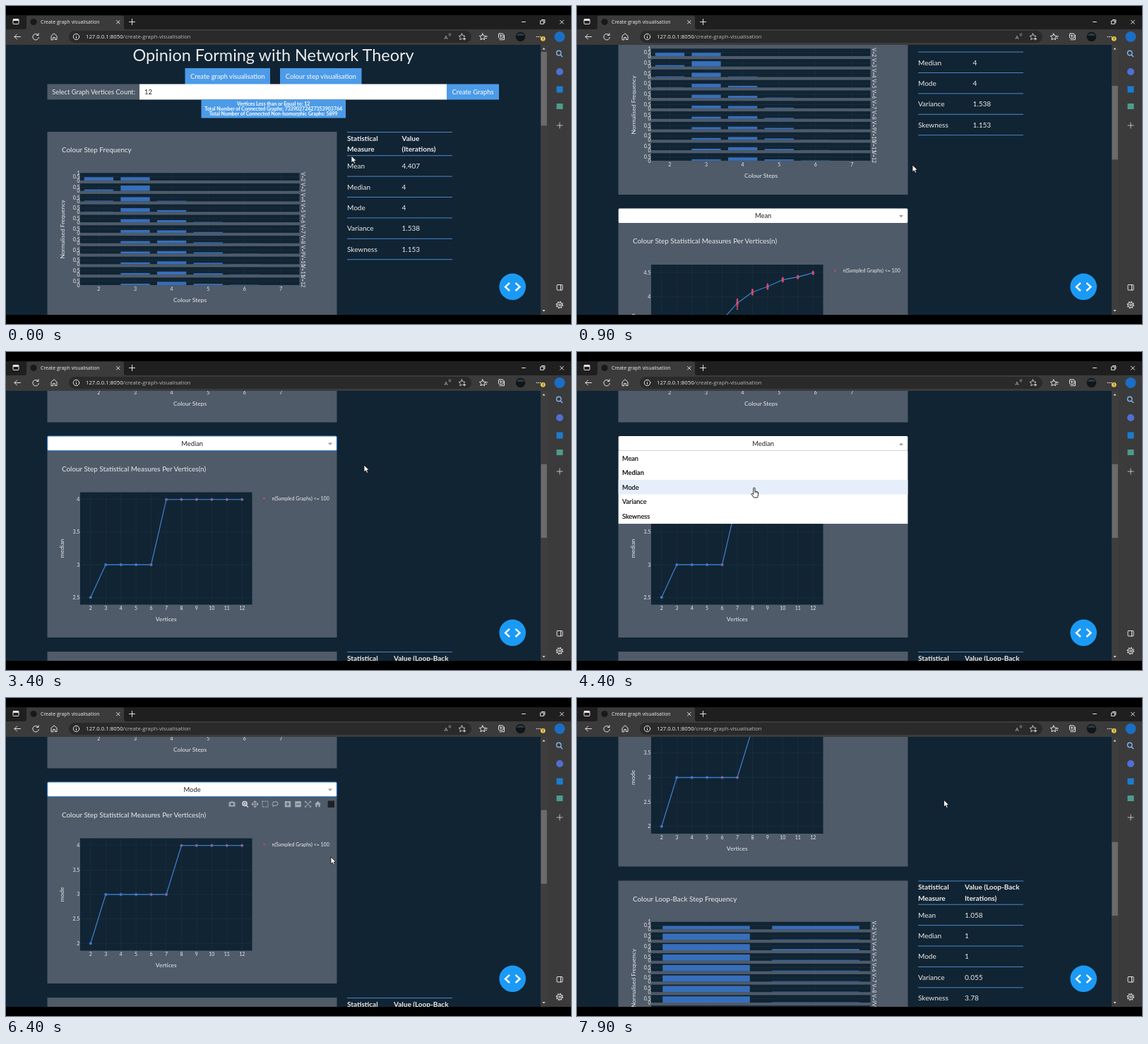
Animation, 800 px wide and 450 px high, one loop 8 s. Source, as an HTML page:

```html
<!DOCTYPE html>
<html lang="en">
<head>
<meta charset="utf-8">
<title>Create graph visualisation</title>
<style>
html, body { margin: 0; width: 100%; height: 100%; overflow: hidden; background: #000; }
svg { display: block; width: 800px; height: 450px; }
text { font-family: Lato, "Open Sans", sans-serif; white-space: pre; }
.ui { font-family: "Open Sans", "Noto Sans", sans-serif; }
.ico { fill: none; stroke: #e4e4e4; stroke-width: 1; stroke-linecap: round; stroke-linejoin: round; }
</style>
</head>
<body>
<svg id="stage" viewBox="0 0 800 450" xmlns="http://www.w3.org/2000/svg"></svg>
<script>
const LOOP = 8000, STEP = 100;
const NAVY = '#112433', CARD = '#4f5b69', BLUE = '#4c9be8', BAR = '#386fba', GRID = '#1d3343', RED = '#d9485e', PALE = '#ebebeb';
const MENU_Y = 462.5, LIST_Y = 483, ROW_H = 20.65;

const rect = (x, y, w, h, fill, more = '') => `<rect x="${x}" y="${y}" width="${w}" height="${h}" fill="${fill}" ${more}/>`;
const disc = (x, y, r, fill, more = '') => `<circle cx="${x}" cy="${y}" r="${r}" fill="${fill}" ${more}/>`;
const path = (d, more = 'class="ico"') => `<path d="${d}" ${more}/>`;
const text = (s, x, y, size = 9.375, fill = PALE, more = '') =>
  `<text x="${x}" y="${y}" font-size="${size}" fill="${fill}" ${more}>${s.replace(/</g, '&lt;')}</text>`;
const mid = 'text-anchor="middle" ', end = 'text-anchor="end" ', bold = 'font-weight="700" ';
const medium = 'stroke="#111" stroke-width=".2"';
const turned = (s, x, y, size, angle) =>
  `<g transform="translate(${x} ${y}) rotate(${angle})">${text(s, 0, size * .34, size, PALE, mid)}</g>`;
const range = (n, f) => Array.from({ length: n }, (_, i) => f(i)).join('');

function header() {
  const button = (x, w, s) => rect(x, 88, w, 23, BLUE) + text(s, x + w / 2, 103, 9.375, '#fff', mid);
  const notes = ['Vertices Less than or Equal to: 12',
    'Total Number of Connected Graphs: 73390272427353903764',
    'Total Number of Connected Non-Isomorphic Graphs: 5899'];
  return text('Opinion Forming with Network Theory', 378.5, 77.7, 23.44, PALE, mid) +
    button(253.5, 120.5, 'Create graph visualisation') + button(388, 115.5, 'Colour step visualisation') +
    rect(58.5, 110.5, 131, 22, CARD) + text('Select Graph Vertices Count:', 65.3, 125) +
    rect(189, 110.5, 435, 22, '#fff') + text('12', 196, 125, 9.375, '#222') +
    rect(624, 110.5, 74, 22, BLUE) + text('Create Graphs', 661, 125, 9.375, '#fff', mid) +
    rect(276.5, 132.5, 204.5, 26, BLUE) +
    notes.map((s, i) => text(s, 378.7, 140.8 + i * 7.1, 7.03, '#fff', mid + bold)).join('');
}

function table(y, x2, head, values) {
  const names = ['Mean', 'Median', 'Mode', 'Variance', 'Skewness'];
  const size = 10;
  const line = dy => rect(483, y + dy - .5, 149, 1, '#4788c9');
  const heading = (lines, x) => lines.map((s, i) => text(s, x, y + 12.6 + i * 15.8, size, PALE, bold)).join('');
  return line(.5) + line(33.7) + heading(['Statistical', 'Measure'], 483) + heading(head, x2) +
    names.map((s, i) => {
      const dy = 33.7 + i * 29.4;
      return text(s, 483, y + dy + 18.4, size) + text(values[i], x2, y + dy + 18.4, size) + line(dy + 29.4);
    }).join('');
}

// Stack of eleven small bar charts, one per vertex count.
function barChart(y, title, rows, labels, x0, pitch, width) {
  const rowH = 10.6, gap = 14.8, top = y + 58.3;
  return rect(58.5, y, 410, 265, CARD) + text(title, 79, y + 29.3, 9.9) +
    range(rows.length, i => {
      const ry = top + i * gap, base = ry + rowH;
      return rect(105, ry, 310.5, rowH, NAVY) + rect(105, ry + rowH / 2 - .3, 310.5, .6, GRID) +
        labels.map((_, k) => rect(x0 + k * pitch - .3, ry, .6, rowH, GRID)).join('') +
        rows[i].map((v, k) => v ? rect(x0 + k * pitch - width / 2, base - v * rowH, width, v * rowH, BAR) : '').join('') +
        (i ? '' : text('1', 104.5, ry + 2.6, 7, PALE, end)) +
        text('0.5', 104.5, ry + rowH / 2 + 2.3, 7, PALE, end) + text('0', 104.5, base + 2.6, 7, PALE, end) +
        turned('V=' + (i + 2), 420.3, ry + rowH / 2, 7, 90);
    }) +
    labels.map((s, k) => text(s, x0 + k * pitch, y + 225.2, 7, PALE, mid)).join('') +
    turned('Normalised Frequency', 80, y + 138, 8.45, -90) +
    text('Colour Steps', 260.5, y + 241, 8.45, PALE, mid);
}

const SERIES = [
  { name: 'Mean', min: 2.5, max: 4.5, low: 690.7, high: 553, values: [2.5, 2.75, 3.04, 3.31, 3.525, 3.87, 4.095, 4.21, 4.35, 4.405, 4.49],
    spread: [0, 0, 0, 0, 6, 5.2, 3.6, 3.2, 2.6, 1.8, 1.8] },
  { name: 'Median', min: 2.5, max: 4, low: 690.7, high: 552.2, values: [2.5, 3, 3, 3, 3, 4, 4, 4, 4, 4, 4] },
  { name: 'Mode', min: 2, max: 4, low: 690.7, high: 552.2, values: [2, 3, 3, 3, 3, 3, 4, 4, 4, 4, 4] }
];
const OPTIONS = ['Mean', 'Median', 'Mode', 'Variance', 'Skewness'];

function lineChart({ name, min, max, low, high, values, spread }) {
  const px = i => 119.8 + i * 21.44;
  const py = v => low + (v - min) / (max - min) * (high - low);
  const ticks = (max - min) * 2 + 1;
  const pts = values.map((v, i) => `${px(i).toFixed(1)},${py(v).toFixed(1)}`).join(' ');
  const dots = (v, i) => {
    if (i < 4) return '';
    if (!spread) return disc(px(i), py(v), 1.5, RED, 'opacity=".75"');
    const n = i === 4 ? 2 : 6;
    return range(n, k => disc(px(i), py(v) + (k / (n - 1) * 2 - 1) * spread[i], 1.3, RED)) +
      (i === 5 ? disc(px(i), py(v) + 8.3, 1.2, RED) : '');
  };
  return rect(105, 542, 243.5, 159, NAVY) +
    range(11, i => rect(px(i) - .3, 542, .6, 159, GRID) + text(String(i + 2), px(i), 708.7, 7, PALE, mid)) +
    range(ticks, k => {
      const v = min + k / 2, y = py(v);
      return rect(105, y - .3, 243.5, .6, GRID) + text(String(v), 104.3, y + 2.5, 7, PALE, end);
    }) +
    `<polyline points="${pts}" fill="none" stroke="#3d7ac6" stroke-width="1.3"/>` +
    values.map((v, i) => disc(px(i), py(v), 2, '#3d7ac6')).join('') + values.map(dots).join('') +
    turned(name.toLowerCase(), 79, 621.5, 8.45, -90);
}

function modebar() {
  const at = (x, d) => `<g transform="translate(${x} 493.7)">${d}</g>`;
  const g = 'fill="none" stroke="#9aa3ad" stroke-width="1.1"';
  const solid = 'fill="#a3abb4"', cut = `fill="none" stroke="${CARD}" stroke-width="1.2"`;
  return at(320, rect(-4.5, -3, 9, 6.5, '#9aa3ad') + rect(-2, -4, 4, 2, '#9aa3ad') + disc(0, 0, 1.8, CARD)) +
    at(338, disc(0, -.6, 3, 'none', 'stroke="#dde1e5" stroke-width="1.5"') + path('M2 1.6L4.8 4.4M-1.4 -.6H1.4M0 -2V.8', 'stroke="#dde1e5" stroke-width="1.3"')) +
    at(352.6, path('M-4 0H4M0 -4V4M-4.5 0l1.5-1.5v3zM4.5 0l-1.5-1.5v3zM0-4.5l-1.5 1.5h3zM0 4.5l-1.5-1.5h3z', g)) +
    at(367, rect(-4, -4, 8, 8, 'none', 'stroke="#9aa3ad" stroke-width="1.2" stroke-dasharray="2 1"')) +
    at(381, path('M-2.5 2C-6 0-3-4 1-3.5S5 1 1 2S-3 0-2.8 4', g)) +
    at(399, rect(-4.2, -4.2, 8.4, 8.4, '#a3abb4') + path('M-2.6 0H2.6M0-2.6V2.6', cut)) +
    at(413.5, rect(-4.2, -4.2, 8.4, 8.4, '#a3abb4') + path('M-2.6 0H2.6', cut)) +
    at(427.5, path('M-4-2V-4H-2M2-4H4V-2M4 2V4H2M-2 4H-4V2M-3-3L3 3M3-3L-3 3', g)) +
    at(441.5, path('M-4.6 0L0-4.2L4.6 0H3.2V4H1V1H-1V4H-3.2V0Z', solid)) +
    at(460.3, rect(-4.7, -4.7, 9.4, 9.4, '#1d2127'));
}

function page() {
  const steps = [[.44, .44], [.2, .72], [.1, .57, .08], [.04, .49, .23], [0, .42, .29, .05], [0, .37, .33, .1],
    [0, .29, .36, .13, .01], [0, .29, .35, .19, .03], [0, .24, .37, .18, .03], [0, .21, .4, .18, .03], [0, .19, .43, .18, .04]];
  const second = [.46, .06, .17, .11, .09, .07, .06, .05, .05, .04, .04];
  const loops = second.map((v, i) => [i ? .83 : .46, v]);
  return header() +
    barChart(178, 'Colour Step Frequency', steps, ['2', '3', '4', '5', '6', '7'], 131.4, 51.6, 41.3) +
    table(178, 560.5, ['Value', '(Iterations)'], ['4.407', '4', '4', '1.538', '1.153']) +
    rect(58.5, LIST_Y, 410, 264.5, CARD) +
    text('Colour Step Statistical Measures Per Vertices(n)', 79, 512.4, 9.9) +
    disc(365.5, 550.8, 1.3, RED) +
    `<g clip-path="url(#legend)">${text('n(Sampled Graphs) <= 100', 376.5, 553.2, 7)}</g>` +
    text('Vertices', 226.8, 724.6, 8.45, PALE, mid) +
    SERIES.map((s, i) => `<g id="line${i}">${lineChart(s)}</g>`).join('') +
    `<g id="modebar">${modebar()}</g>` +
    barChart(767.5, 'Colour Loop-Back Step Frequency', loops, ['1', '2'], 183, 155, 123.5) +
    table(767.5, 549, ['Value (Loop-Back', 'Iterations)'], ['1.058', '1', '1', '0.055', '3.78']) +
    '<g id="menu"></g>';
}

function menu(open, picked, hover) {
  const focus = picked > 0 && !open ? 'stroke="#3a86d8" stroke-width="1.2"' : '';
  let s = rect(58.7, MENU_Y, 409.6, 20.5, '#fff', 'rx="1.5" ' + focus) +
    text(OPTIONS[picked], 263.6, MENU_Y + 13.5, 9.375, '#222', mid) +
    path(open ? 'M456 475.2h6l-3-3.2z' : 'M456 472h6l-3 3.2z', 'fill="#999"');
  if (!open) return s;
  s += rect(58.7, LIST_Y, 409.6, ROW_H * 5 + .3, '#fff') + rect(58.7, LIST_Y - .4, 409.6, .7, '#d5d8dc');
  return s + OPTIONS.map((o, i) => (i === hover ? rect(58.7, LIST_Y + i * ROW_H, 409.6, ROW_H, '#e5eefa') : '') +
    text(o, 64, LIST_Y + i * ROW_H + 14, 9.2, '#111', i === picked ? bold : medium)).join('');
}

function chrome() {
  const bar = '#3b3b3b';
  const star = (x, y) => path(`M${x} ${y - 4.5}l1.4 3 3.1.4-2.3 2.2.6 3.2-2.8-1.6-2.8 1.6.6-3.2-2.3-2.2 3.1-.4z`);
  return rect(0, 0, 800, 13, '#000') + rect(0, 13, 800, 20, '#1f1f1f') + rect(0, 33, 800, 22, bar) +
    path('M26 33q3 0 3-3V16.5q0-3 3-3h132q3 0 3 3V30q0 3 3 3z', `fill="${bar}"`) +
    rect(767, 33, 33, 404, bar) + rect(0, 437, 800, 13, '#000') +
    rect(10, 18.5, 8, 7, 'none', 'class="ico" rx="1"') + rect(10, 18.5, 8, 2.5, '#e4e4e4') +
    disc(39, 22.5, 4.6, '#17191c') +
    text('Create graph visualisation', 49, 25, 6.95, '#f0f0f0', 'class="ui"') +
    path('M156.5 20.5l4.5 4.5m0-4.5l-4.5 4.5M178.5 18.5v8m-4-4h8') +
    path('M730.5 22.5h5M784.5 20.2l5 5m0-5l-5 5') + rect(757, 21, 4.4, 4.4, 'none', 'class="ico"') + path('M758.5 19.5h4.4v4.4') +
    path('M20.5 43.5h-8.5m3.5-3.5l-3.5 3.5 3.5 3.5M45.5 41a4.3 4.3 0 1 0 .9 3.5M46 38.8v2.7h-2.7') +
    path('M64 47.5v-5l4-3.7 4 3.7v5h-2.7v-3h-2.6v3z') +
    rect(89, 35, 570, 17, '#2a2a2a', 'rx="8.5"') +
    disc(99.5, 43.5, 4.2, 'none', 'class="ico"') + path('M99.5 43.3v2.3M99.5 41.3v.1') +
    `<text class="ui" x="113" y="46.3" font-size="7.75" fill="#f5f5f5">127.0.0.1:8050<tspan fill="#b9b9b9">/create-graph-visualisation</tspan></text>` +
    text('A', 620.5, 46.5, 8, '#bbb', 'class="ui"') + path('M627 39q1.3 1.2 0 3M628.7 38.2q2 2 0 4.6', 'fill="none" stroke="#bbb" stroke-width=".7"') +
    `<g opacity=".8">${star(645.5, 43.5)}</g>` + disc(649, 46.5, 2.6, '#2a2a2a') + path('M649 44.8v3.4m-1.7-1.7h3.4') +
    star(674.8, 43.5) + path('M679 43h2.5M679 45.5h1.5') +
    rect(697.5, 39, 6.5, 6.5, 'none', 'class="ico" rx="1"') + path('M699 47.7h6.5v-6.5M700.7 40.7v3m-1.5-1.5h3') +
    disc(728.5, 43.5, 6.7, '#101518') + path('M723 42a6 6 0 0 1 11 0z', 'fill="#2d3b42"') +
    [751.5, 754, 756.5].map(x => disc(x, 43.5, .8, '#e4e4e4')).join('') +
    disc(760.3, 46.3, 3.4, '#e9c64d') + rect(760, 44.3, .8, 2.6, '#333') + rect(760, 47.5, .8, .8, '#333') +
    disc(784, 43.5, 7.5, '#1c6ec4') +
    disc(782.7, 66.5, 3.2, 'none', 'stroke="#7fb2e8" stroke-width="1.4"') + path('M785 69l3 3', 'stroke="#7fb2e8" stroke-width="1.5"') +
    disc(784, 93, 5, '#4f6fd6') + rect(779.5, 113.5, 9, 9, '#1b7cd0') + rect(779.5, 138, 9, 8, '#4c9c8c') +
    path('M784 165v8m-4-4h8', 'class="ico" opacity=".75"') +
    rect(780, 394.5, 8, 7.5, 'none', 'class="ico" rx="1"') + path('M785.5 394.5v7.5') +
    disc(783.8, 423, 3.6, 'none', 'class="ico"') + disc(783.8, 423, 1.3, 'none', 'class="ico"') +
    disc(783.8, 423, 4.6, 'none', 'stroke="#e4e4e4" stroke-width="1.1" stroke-dasharray="1.8 1.8"');
}

const CURSORS = {
  arrow: path('M0 0V9.8L2.3 7.7L3.9 11.2L5.6 10.4L4.1 7.1H7.2Z', 'fill="#fff" stroke="#000" stroke-width=".7"'),
  beam: path('M-2-4.5H-.6L0-4L.6-4.5H2M0-4V4M-2 4.5H-.6L0 4L.6 4.5H2', 'fill="none" stroke="#222" stroke-width="1"'),
  hand: path('M-1.2 0C-1.2-1.4 1-1.4 1 0V4L4.5 4.8Q6 5.2 5.8 7L5 11.5 4.5 13H-.5L-4 8.5Q-4 7-2.6 7.4L-1.2 8.5Z', 'fill="#fff" stroke="#111" stroke-width=".9"') +
    path('M1 4v2.5M2.7 4.5v2.2M4.3 5v2', 'stroke="#111" stroke-width=".6"')
};

document.getElementById('stage').innerHTML =
  `<defs><clipPath id="view"><rect y="55" width="757" height="382"/></clipPath>
   <clipPath id="legend"><rect x="370" y="540" width="89" height="20"/></clipPath></defs>` +
  rect(0, 55, 800, 382, NAVY) + `<g clip-path="url(#view)"><g id="page">${page()}</g></g>` +
  disc(717.2, 397.3, 18.8, '#1b9af5') +
  path('M713 391.8l-6 5.6 6 5.6M721.5 391.8l6 5.6-6 5.6', 'fill="none" stroke="#fff" stroke-width="2.4"') +
  rect(757, 55, 10, 382, '#3e3e3e') + path('M759.5 61.5h4l-2-2.6zM759.5 430h4l-2 2.6z', 'fill="#ddd"') +
  `<g id="thumb">${rect(757.5, 65, 8.3, 104.3, '#6b6b6b')}</g>` + chrome() + '<g id="cursor"></g>';

// Rows of [time, value, ...], joined by straight moves.
const SCROLL = [[0, 0], [300, 0], [900, 176], [1300, 343.5], [6700, 343.5], [7500, 509]];
const MOVE = [[0, 489, 212], [300, 489, 212], [900, 475, 225], [1200, 470, 218], [1600, 397.7, 137], [1900, 390, 137], [2300, 262, 167],
  [2600, 258, 168], [3100, 507, 160], [3500, 507, 160], [3900, 392, 131], [4050, 384, 132], [4400, 251, 193], [4900, 249, 193],
  [5700, 452, 221], [6400, 460, 225], [6600, 460, 225], [7200, 519.5, 144.3]];
const OPEN = [[1500, 2500], [4000, 4800]];
const PICKED = [[0, 0], [2500, 1], [4800, 2]];

function sample(rows, t) {
  const i = rows.findLastIndex(k => k[0] <= t), a = rows[i], b = rows[i + 1];
  if (!b) return a.slice(1);
  const u = (t - a[0]) / (b[0] - a[0]);
  return a.slice(1).map((v, k) => v + (b[k + 1] - v) * u);
}

const $ = id => document.getElementById(id);
function draw(t) {
  const [scroll] = sample(SCROLL, t), [x, y] = sample(MOVE, t);
  const picked = PICKED.findLast(k => k[0] <= t)[1];
  const open = OPEN.some(([a, b]) => t >= a && t < b);
  const py = y + scroll, inside = x > 58 && x < 468;
  const over = Math.floor((py - LIST_Y) / ROW_H);
  const onList = open && inside && over >= 0 && over < 5;
  const onBox = inside && py > MENU_Y && py < LIST_Y;
  $('page').setAttribute('transform', `translate(0 ${-scroll})`);
  $('thumb').setAttribute('transform', `translate(0 ${scroll * .2727})`);
  SERIES.forEach((_, i) => $('line' + i).style.display = i === picked ? '' : 'none');
  $('modebar').style.display = !open && inside && py > LIST_Y && py < 747 ? '' : 'none';
  $('menu').innerHTML = menu(open, picked, onList ? over : picked);
  $('cursor').setAttribute('transform', `translate(${x} ${y})`);
  $('cursor').innerHTML = CURSORS[onList ? 'hand' : onBox ? 'beam' : 'arrow'];
}

const start = performance.now();
let shown = -1;
function tick() {
  const t = Math.floor((performance.now() - start) % LOOP / STEP) * STEP;
  if (t !== shown) draw(shown = t);
  requestAnimationFrame(tick);
}
draw(0);
requestAnimationFrame(tick);
</script>
</body>
</html>
```
